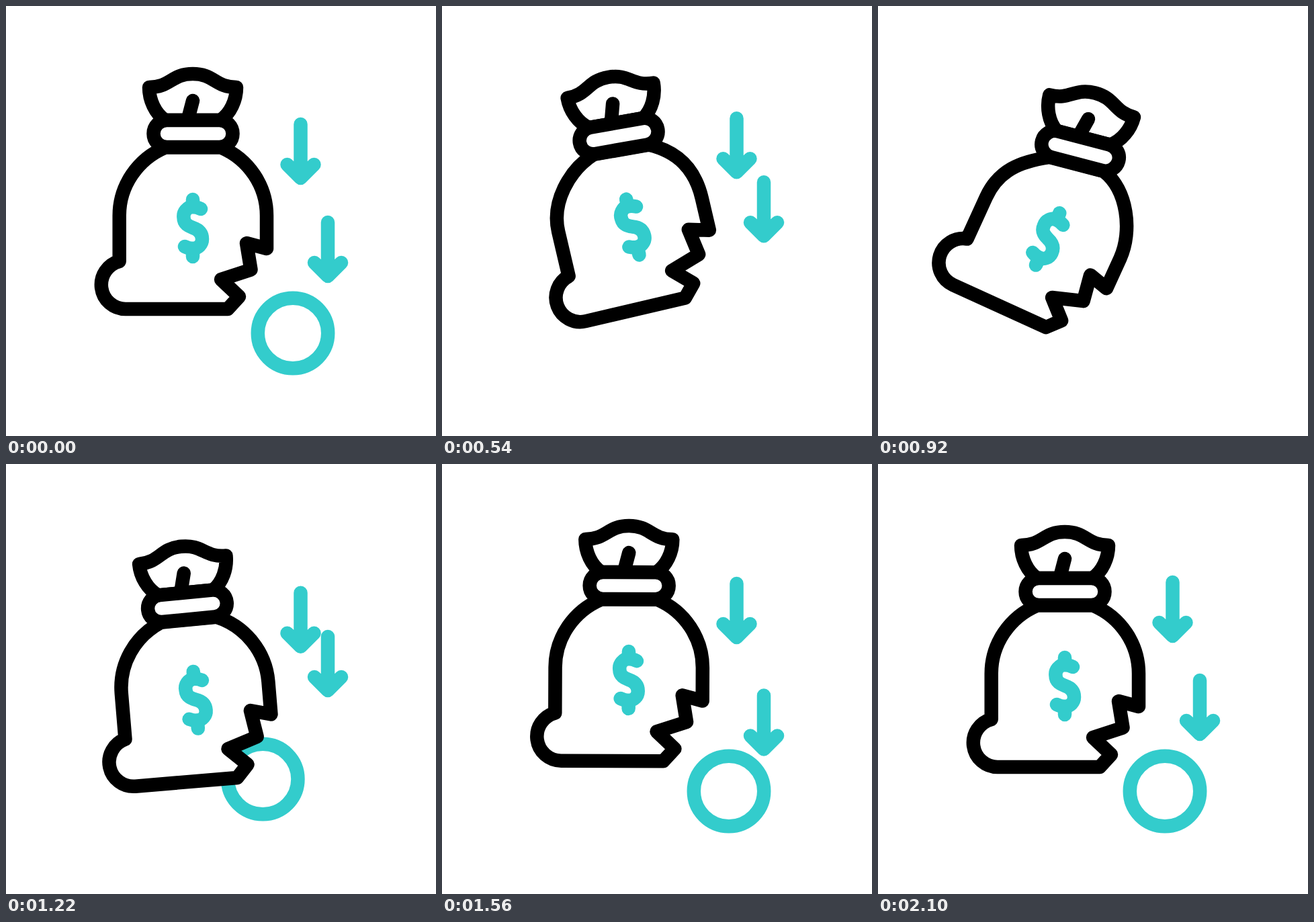
Write an HTML page that moves like this. It is 640x640 px and loops after 2.4 s.

```html
<!DOCTYPE html>
<html lang="en">
<head>
<meta charset="utf-8">
<title>Torn money bag</title>
<style>
  html, body { margin: 0; width: 100%; height: 100%; overflow: hidden; background: #fff; }
  svg { display: block; width: 100%; height: 100%; }
  svg * { stroke-width: 20.5; stroke-linecap: round; stroke-linejoin: round; }
  .teal { stroke: #33cccc; fill: none; }
  .ink { stroke: #000; fill: #fff; }
</style>
</head>
<body>
<svg viewBox="0 0 640 640">
  <circle id="coin" class="teal" r="52.2"/>
  <path id="body" class="ink"/>
  <g id="dollar" class="teal">
    <path d="M278 288V299M278 361V373"/>
    <path d="M290 302Q284 299 278 299A13.5 14 0 0 0 264.5 315C264.5 325 273 328 278 330C284 332 292 336 292 347A14 14 0 0 1 278 361Q272 361 266 358"/>
  </g>
  <g id="neck" class="ink">
    <path d="M237 170C222 160 213 140 213 121C245 121 246 101 278 101C310 101 311 121 343 121C343 140 334 160 319 170Z"/>
    <path d="M278 141L272.5 162"/>
    <rect x="219.5" y="170" width="118" height="40" rx="20"/>
  </g>
  <g id="arrowA" class="teal"><path d="M438.5 176V256M418.5 236L438.5 256L458.5 236"/></g>
  <g id="arrowB" class="teal"><path d="M479 322V402M459 382L479 402L499 382"/></g>
</svg>
<script>
const LOOP = 2400, ACTIVE = 2100, STEP = 20, ARROW_LAG = 119;
const PIVOT = { x: 278, y: 279 };
const el = id => document.getElementById(id);
const ramp = (t, from, to) => Math.min(1, Math.max(0, (t - from) / (to - from)));
const ease = (t, from, to) => (1 - Math.cos(Math.PI * ramp(t, from, to))) / 2;
const mix = (a, b, p) => a + (b - a) * p;

// Crouch, leap, land and recoil.
const bounce = t => 31 * ease(t, 0, 240) - 75 * ease(t, 400, 730) + 94 * ease(t, 730, 1028)
  - 72 * ease(t, 1064, 1420) + 22 * ease(t, 1420, 1670);

// Lean back, toss forward, then swing out to rest.
function sway(t, { lean, release, toss, rebound, settle }) {
  return lean * ease(t, 0, 240) + (toss - lean) * ease(t, release, 915)
    + (rebound - toss) * ease(t, 920, 1320) + (settle - rebound) * ease(t, 1320, 1700)
    - settle * ease(t, 1700, ACTIVE);
}
const BODY_SWAY = { lean: -15, release: 480, toss: 24.5, rebound: -9.8, settle: 4.5 };
const NECK_SWAY = { lean: -10, release: 530, toss: 14.7, rebound: -9, settle: 4 };

function place(id, { dx, dy, deg }) {
  el(id).setAttribute("transform", `translate(${dx} ${dy}) rotate(${deg} ${PIVOT.x} ${PIVOT.y})`);
}

function mapper({ dx, dy, deg }) {
  const a = deg * Math.PI / 180, c = Math.cos(a), s = Math.sin(a);
  return (x, y) => {
    const u = x - PIVOT.x, v = y - PIVOT.y;
    return `${(PIVOT.x + dx + u * c - v * s).toFixed(2)} ${(PIVOT.y + dy + u * s + v * c).toFixed(2)} `;
  };
}

// The shoulders follow the neck; everything below follows the body.
function bagPath(neck, body) {
  const n = mapper(neck), b = mapper(body);
  return "M" + n(237, 210.5) + "C" + n(196, 227.8) + b(168.7, 267.6) + b(168.7, 312) +
    "L" + b(168.7, 380) + "A36.1 36.1 0 0 0 " + b(178, 451) +
    "L" + b(330, 451) + b(347, 432.5) + b(320, 407) + b(364.5, 392.5) + b(358, 353) +
    b(388, 361) + b(388, 312) +
    "C" + b(388, 267.6) + n(361, 227.8) + n(320, 210.5) + "Z";
}

// Rise, drop away, then fall in again from above with an overshoot.
function drawArrow(id, t) {
  const leaving = t < 1000;
  const y = leaving
    ? -60 * ease(t, 0, 440) + 170 * ease(t, 440, 710)
    : -100 + 140 * ease(t, 1000, 1303) - 40 * ease(t, 1303, 1602);
  el(id).setAttribute("transform", `translate(0 ${y})`);
  el(id).setAttribute("opacity", leaving ? 1 - ramp(t, 630, 710) : ramp(t, 1000, 1060));
}

// Fall away to the lower right, then roll out from behind the bag.
function drawCoin(t) {
  const leaving = t < 700;
  const p = leaving ? ease(t, 0, 460) : ease(t, 1040, 1305);
  const coin = el("coin");
  coin.setAttribute("cx", leaving ? mix(427, 478, p) : mix(235, 427, p));
  coin.setAttribute("cy", leaving ? mix(487, 571, p) : mix(410, 487, p));
  coin.setAttribute("opacity", leaving ? 1 - ramp(t, 340, 460) : +(t > 1040));
}

function draw(t) {
  const dy = bounce(t);
  const drag = Math.sin(Math.PI * ramp(t, 0, 1200));
  const neck = { dx: 0, dy, deg: sway(t, NECK_SWAY) };
  const body = { dx: -6 * drag, dy: dy - 2.5 * drag, deg: sway(t, BODY_SWAY) };
  el("body").setAttribute("d", bagPath(neck, body));
  place("neck", neck);
  place("dollar", body);
  drawArrow("arrowA", t);
  drawArrow("arrowB", Math.max(0, t - ARROW_LAG));
  drawCoin(t);
}

const start = performance.now();
function tick() {
  const t = (performance.now() - start) % LOOP;
  draw(Math.min(ACTIVE, Math.floor(t / STEP) * STEP));
  requestAnimationFrame(tick);
}
tick();
</script>
</body>
</html>
```
